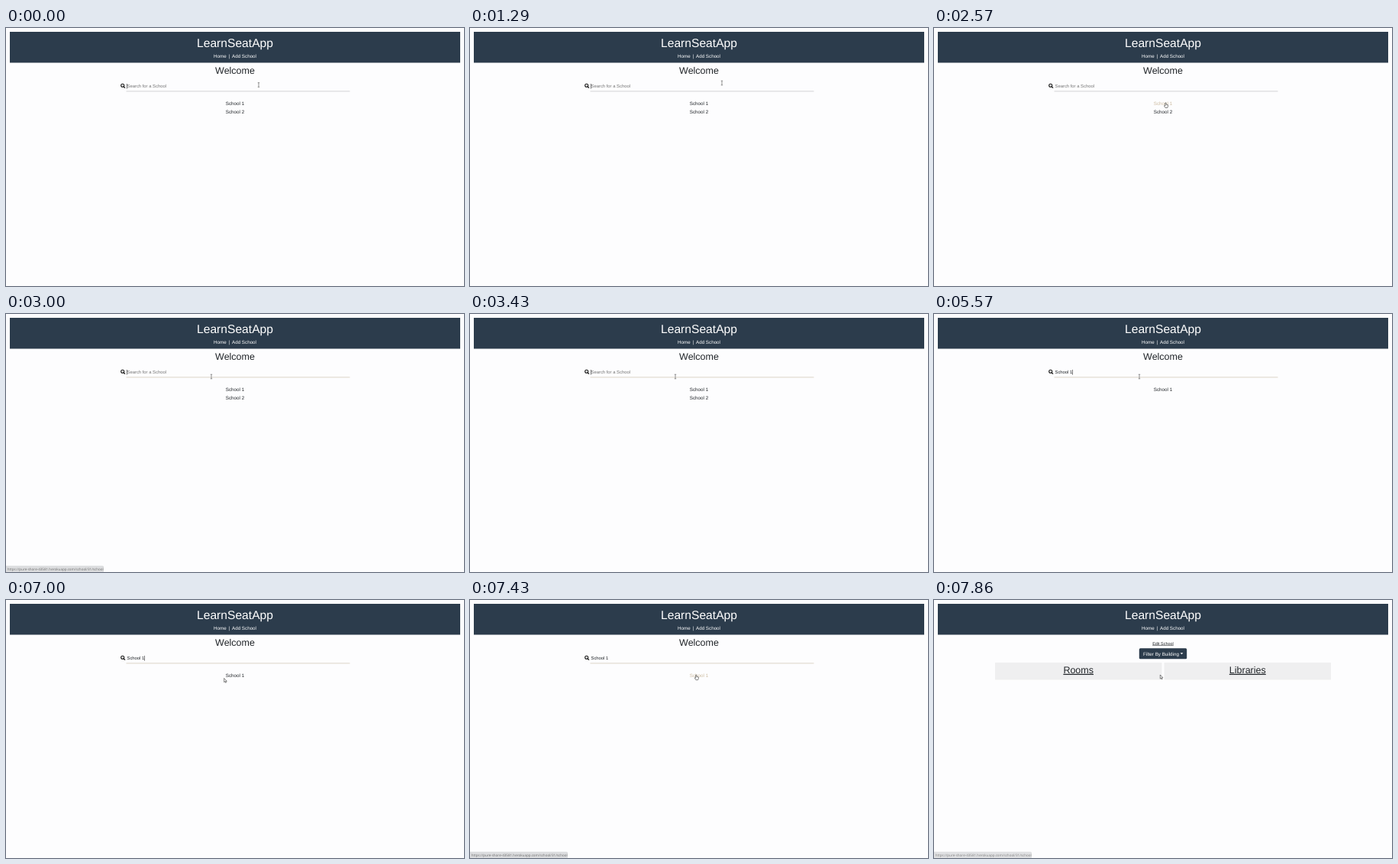
Animation, 600 px wide and 338 px high, one loop 8000 ms. Source, as an HTML page:

```html
<!DOCTYPE html>
<html lang="en">
<head>
<meta charset="utf-8">
<title>School search</title>
<style>
  html, body { margin: 0; width: 100%; height: 100%; overflow: hidden; background: #fdfdfe; }
  svg { display: block; width: 600px; height: 338px; }
  text {
    font: 6.25px "Liberation Sans", Arial, sans-serif;
    fill: #212529;
    text-rendering: geometricPrecision;
    white-space: pre;
  }
  .mid { text-anchor: middle; }
  .light { fill: #fff; }
  .h1 { font-size: 15.63px; }
  .h2 { font-size: 12.5px; }
  .input { font-size: 5.86px; }
  .small { font-size: 5.47px; }
  .link { text-decoration: underline; }
  .url { font: 4.55px "Open Sans", sans-serif; fill: #6b6b6b; }
</style>
</head>
<body>
<svg viewBox="0 0 600 338">
  <rect width="600" height="338" fill="#fdfdfe"/>
  <rect x="5" y="5" width="590" height="40.5" fill="#2c3c4c"/>
  <text class="mid light h1" x="300" y="24.6">LearnSeatApp</text>
  <text class="light" x="272" y="39.4">Home</text>
  <text class="mid light" x="292.5" y="39.2">|</text>
  <text class="light" x="296" y="39.4">Add School</text>

  <g id="searchPage">
    <text class="mid h2" x="300" y="60">Welcome</text>
    <g fill="none" stroke="#151515" stroke-width="1.1">
      <circle cx="152.7" cy="75.3" r="2"/>
      <path d="M154.2 76.8L156 78.6" stroke-width="1.3"/>
    </g>
    <path id="underline" d="M157.5 82.9H450.5" stroke-width=".8"/>
    <text id="placeholder" class="input" x="158.5" y="78" style="fill:#757575">Search for a School</text>
    <text id="typed" class="input" x="158.5" y="78"></text>
    <rect id="caret" y="73" width=".6" height="6.6" fill="#222"/>
    <text id="school1" class="mid" x="300" y="101">School 1</text>
    <text id="school2" class="mid" x="300" y="112">School 2</text>
  </g>

  <g id="schoolPage">
    <text class="mid small link" x="300" y="58.5">Edit School</text>
    <rect x="268.8" y="63.3" width="62.4" height="14" rx="1.6" fill="#2c3c4c"/>
    <text class="light" x="274" y="72.6">Filter By Building</text>
    <path d="M322.6 69.2h3.8l-1.9 2z" fill="#fff"/>
    <path d="M80 82H298.5V104.5H80zM301.5 82H520V104.5H301.5z" fill="#efeff0"/>
    <text class="mid h2 link" x="189.2" y="95.8">Rooms</text>
    <text class="mid h2 link" x="410.8" y="95.8">Libraries</text>
  </g>

  <g id="status">
    <path d="M0 329.8H126.5Q128 329.8 128 331.3V338H0z" fill="#dcdddf"/>
    <text class="url" x="1.8" y="335.6">https://pure-shore-43581.herokuapp.com/school/31/school</text>
  </g>

  <g id="cursor" stroke-linejoin="round">
    <path id="beam" d="M-1.2 -2.8H1.2M0 -2.8V2.8M-1.2 2.8H1.2" stroke="#666" stroke-width=".7"/>
    <path id="arrow" d="M0 0V5.2L1.2 4.1L2 5.9L2.8 5.5L2 3.8H3.6Z" fill="#fff" stroke="#333" stroke-width=".6"/>
    <path id="hand" d="M-.6 .5Q0 -.3 .6 .5V2.4L3 3V5L2.3 6.7H-.4L-2 4.2L-1.5 3.5L-.6 4.2Z" fill="#fff" stroke="#333" stroke-width=".6"/>
  </g>
</svg>

<script>
const LOOP = 8000, TICK = 1000 / 7;
const query = "School 1";
const keyTicks = [27, 30, 31, 32, 33, 35, 36, 39];
const caretOn = [[0, 2], [6, 10], [14, 18], [21, 25], [27, 43], [47, 51]];
const statusOn = [[19, 24], [51, 56]];
const PAGE_CHANGE = 53;

// Pointer stops: tick, x, y
const path = [
  [0, 331, 74.5], [8, 331, 74.5], [9, 330, 72], [12, 333, 76], [16, 322, 89],
  [17, 308, 96.5], [18, 303.5, 97.8], [19, 300, 97], [20, 281, 86], [21, 269, 82],
  [46, 269, 82], [47, 272, 86], [49, 285.7, 102.5], [50, 291, 100.5], [51, 296.3, 98], [56, 296.3, 98]
];

const el = {};
for (const node of document.querySelectorAll("svg [id]")) el[node.id] = node;

const show = (node, on) => node.setAttribute("visibility", on ? "inherit" : "hidden");
const within = (tick, spans) => spans.some(([from, to]) => tick >= from && tick < to);

function pointerAt(tick) {
  const i = path.findIndex(stop => stop[0] > tick);
  const [t0, x0, y0] = path[i - 1], [t1, x1, y1] = path[i];
  const p = (tick - t0) / (t1 - t0);
  return [x0 + (x1 - x0) * p, y0 + (y1 - y0) * p];
}

function render(time) {
  const tick = Math.floor(((time + 5) % LOOP) / TICK) % 56;
  const searching = tick < PAGE_CHANGE;
  const [x, y] = pointerAt(tick);
  const overField = searching && y < 84;
  const overLink = searching && x > 288 && x < 312.5 && y > 95 && y < 103;

  show(el.searchPage, searching);
  show(el.schoolPage, !searching);

  const typed = query.slice(0, keyTicks.filter(k => k <= tick).length);
  el.typed.textContent = typed;
  show(el.placeholder, !typed);
  const width = typed ? el.typed.getComputedTextLength() : 0;
  el.caret.setAttribute("x", 158.2 + width);
  show(el.caret, searching && within(tick, caretOn));
  el.underline.setAttribute("stroke", tick < 20 ? "#c8c8ca" : "#d3cab9");

  el.school1.style.fill = overLink ? "#cdbb9f" : "";
  show(el.school2, searching && typed !== query);

  show(el.status, within(tick, statusOn));
  el.status.setAttribute("opacity", tick === 23 ? 0.4 : tick === 55 ? 0.85 : 1);

  el.cursor.setAttribute("transform", `translate(${x} ${y})`);
  show(el.beam, overField);
  show(el.hand, overLink);
  show(el.arrow, !overField && !overLink);
}

const start = performance.now();
function frame() {
  render(performance.now() - start);
  requestAnimationFrame(frame);
}
frame();
</script>
</body>
</html>
```
